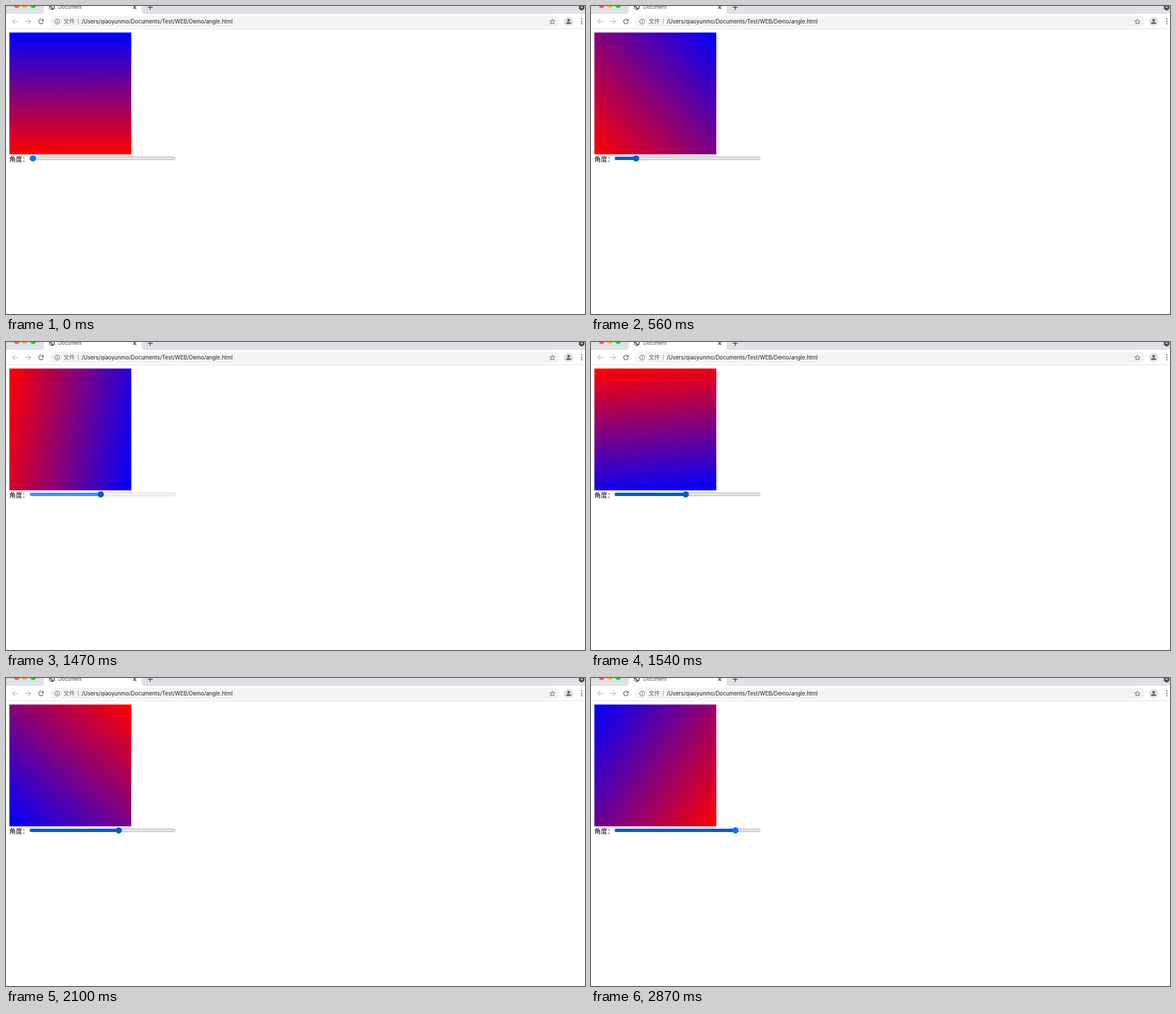
Write an HTML page that moves like this. It is 1026x546 px and loops after 3.01 s.

```html
<!DOCTYPE html>
<html lang="zh">
<head>
<meta charset="utf-8">
<title>Gradient angle</title>
<style>
  html, body { margin: 0; width: 100%; height: 100%; overflow: hidden; background: #fff; }
  svg { position: absolute; left: 0; top: 0; }
  #box { position: absolute; left: 6px; top: 47px; width: 216px; height: 216px; }
  text { font-family: Inter, "Noto Sans CJK SC", "Noto Sans CJK", sans-serif; }
  .line { fill: none; stroke: #5f6368; stroke-width: 1.2; }
</style>
</head>
<body>
<div id="box"></div>
<svg width="1026" height="546" viewBox="0 0 1026 546">
  <!-- tab strip -->
  <path d="M0 0H67V8Q67 14 61 14H0ZM240 0H1026V14H246Q240 14 240 8Z" fill="#dee1e6"/>
  <circle cx="19" cy="-.8" r="4.6" fill="#fc5b57"/>
  <circle cx="33.5" cy="-.8" r="4.6" fill="#fdbc2e"/>
  <circle cx="48" cy="-.8" r="4.6" fill="#28c840"/>
  <circle cx="81.3" cy="2" r="5.1" fill="#4d5156"/>
  <path d="M77.6 1.2L80.5 3.2V5.8Q77.2 5 77.6 1.2ZM81.5 -1.8L84.8 0V2.6L82.8 4.4L82 1.8L79.6 1Z" fill="#fff"/>
  <text x="92.7" y="5.3" font-size="8.5" fill="#45494d">Document</text>
  <path class="line" d="M225.4 -.2L230.6 5M230.6 -.2L225.4 5M251 2.3H260M255.5 -2.2V6.8" style="stroke:#3c4043;stroke-width:1.3"/>
  <circle cx="1020" cy="2.7" r="5" fill="#45494d"/>
  <path d="M1017.6 1.5H1022.4L1020 4.3Z" fill="#fff"/>

  <!-- toolbar -->
  <g class="line" style="stroke:#babcbe">
    <path d="M21 27.4H11.6M16 23L11.6 27.4L16 31.8"/>
    <path d="M34 27.4H43.4M39 23L43.4 27.4L39 31.8"/>
  </g>
  <path class="line" style="stroke-width:1.3" d="M65.1 24.6A4.1 4.1 0 1 0 66 28.6"/>
  <path d="M66.6 22.8V26.9H62.5Z" fill="#5f6368"/>
  <rect x="78" y="17.3" width="903.5" height="20.4" rx="10.2" fill="#f1f3f4"/>
  <circle class="line" cx="90.8" cy="27.5" r="4.4" style="stroke-width:1"/>
  <path class="line" d="M90.8 27V30M90.8 24.8V26" style="stroke-width:1.1"/>
  <text x="102" y="31" font-size="10.1" fill="#5f6368">文件</text>
  <path d="M128 22V33" stroke="#9aa0a6" stroke-width="1"/>
  <text x="134" y="31" font-size="9.65" fill="#202124">/Users/qiaoyunmo/Documents/Test/WEB/Demo/angle.html</text>
  <path class="line" style="stroke-width:1" d="M968.3 23L969.6 26.2L973 26.4L970.4 28.6L971.2 32L968.3 30.2L965.4 32L966.2 28.6L963.6 26.4L967 26.2Z"/>
  <circle cx="997" cy="27.5" r="8.3" fill="#dfe1e5"/>
  <circle cx="997" cy="25.2" r="2.2" fill="#4a5262"/>
  <path d="M992.6 31.6V30.8Q993 28.4 997 28.4Q1001 28.4 1001.4 30.8V31.6Z" fill="#4a5262"/>
  <path d="M1020.2 23.6v0m0 3.9v0m0 3.9v0" stroke="#5f6368" stroke-width="2.4" stroke-linecap="round"/>
  <path d="M0 40.5H1026" stroke="#dcdee1"/>

  <!-- slider -->
  <text x="5.8" y="275.6" font-size="11.52" font-weight="500">角度：</text>
  <rect id="track" x="42.3" y="267.5" width="257.6" height="5.2" rx="2.6" stroke-width=".7"/>
  <rect id="fill" x="42" y="267.2" height="5.8" rx="2.9"/>
  <circle id="thumb" cy="270.1" r="5.6"/>
</svg>
<script>
  const LOOP = 3010;
  const BRIGHT = '#0075ff', DARK = '#005cc8', PRESSED = '#3793ff';

  // Each click: press time, release time, time the pointer leaves the thumb, new angle.
  const clicks = [
    [70, 140, 280, 15],
    [560, 560, 770, 47],
    [980, 1050, 1260, 100],
    [1470, 1540, 1820, 175.5],
    [2030, 2100, 2310, 222],
    [2590, 2660, 2870, 304]
  ];
  const [box, track, fill, thumb] = ['box', 'track', 'fill', 'thumb'].map(id => document.getElementById(id));

  function stateAt(t) {
    const state = { value: 0, angle: 0, pressed: false, onThumb: false };
    for (const [press, release, leave, value] of clicks) {
      if (t < press) break;
      state.value = value;
      state.pressed = t < release;
      state.onThumb = t < leave;
      if (!state.pressed) state.angle = value;   // the gradient follows on release
    }
    return state;
  }

  function draw(now) {
    const { value, angle, pressed, onThumb } = stateAt(now % LOOP);
    const x = 47.76 + value / 360 * 246.5;
    box.style.background = `linear-gradient(${angle}deg, red, blue)`;
    track.setAttribute('fill', pressed ? '#f5f5f5' : '#e5e5e5');
    track.setAttribute('stroke', pressed ? '#c4c4c4' : '#999');
    fill.setAttribute('width', x - 42);
    fill.setAttribute('fill', pressed ? PRESSED : DARK);
    thumb.setAttribute('cx', x);
    thumb.setAttribute('fill', onThumb ? DARK : BRIGHT);
  }

  const start = performance.now();
  (function tick() {
    draw(performance.now() - start);
    requestAnimationFrame(tick);
  })();
</script>
</body>
</html>
```
